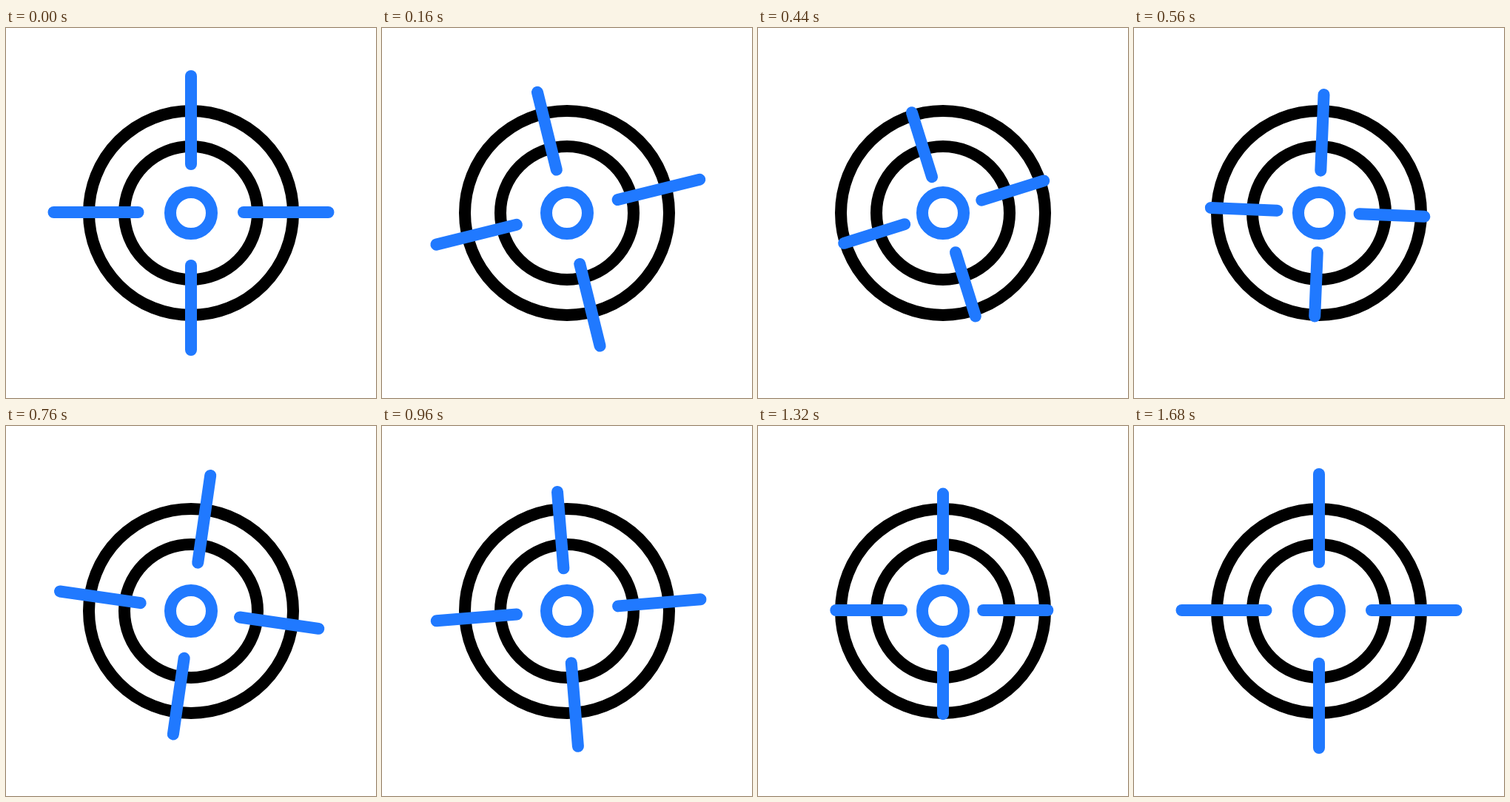
Write an HTML page that moves like this. It is 500 by 500 pixels and loops after 2 s.

```html
<!DOCTYPE html>
<html lang="en">
<head>
<meta charset="utf-8">
<title>Crosshair</title>
<style>
  html, body { margin: 0; height: 100%; overflow: hidden; background: #fff; }
  svg { display: block; width: 100vw; height: 100vh; }
</style>
</head>
<body>
<svg viewBox="0 0 500 500" fill="none" stroke-width="16" stroke-linecap="round">
  <g stroke="#000">
    <circle cx="250" cy="250" r="138"/>
    <circle cx="250" cy="250" r="90"/>
  </g>
  <g stroke="#2079ff">
    <circle cx="250" cy="250" r="28"/>
    <g id="hairs"></g>
  </g>
</svg>
<script>
const LOOP = 2000, STEP = 40, END = 1680;

// [time, value] keys
const swing = [[0, 0], [322, -28], [668, 11.5], [988, -5], [1310, 0]];
const pull = [[0, 0], [370, 1], [755, 0], [1145, 1], [1518, 0]];

const hairs = [
  { turn: 0, delay: 8, inner: 65, outer: 184, shift: 16 },
  { turn: 90, delay: 130, inner: 71, outer: 185.5, shift: 17.5 },
  { turn: 180, delay: 162, inner: 72, outer: 186, shift: 18 },
  { turn: 270, delay: 97, inner: 71.5, outer: 185.5, shift: 17.5 }
];

const group = document.getElementById('hairs');
for (const hair of hairs) {
  hair.path = document.createElementNS('http://www.w3.org/2000/svg', 'path');
  hair.path.setAttribute('transform', `rotate(${hair.turn})`);
  group.append(hair.path);
}

const smooth = x => x * x * (3 - 2 * x);

function valueAt(keys, t) {
  if (t <= keys[0][0]) return keys[0][1];
  for (let i = 1; i < keys.length; i++) {
    const [t0, a] = keys[i - 1], [t1, b] = keys[i];
    if (t < t1) return a + (b - a) * smooth((t - t0) / (t1 - t0));
  }
  return keys[keys.length - 1][1];
}

function draw(now) {
  const t = Math.min(Math.floor(now % LOOP / STEP) * STEP, END);
  group.setAttribute('transform', `translate(250 249) rotate(${valueAt(swing, t)})`);
  for (const { path, delay, inner, outer, shift } of hairs) {
    const p = valueAt(pull, t - delay);
    path.setAttribute('d', `M0 ${-(inner - shift * p)}V${-(outer - 46 * p)}`);
  }
}

const start = performance.now();
function tick() {
  draw(performance.now() - start);
  requestAnimationFrame(tick);
}
tick();
</script>
</body>
</html>
```
